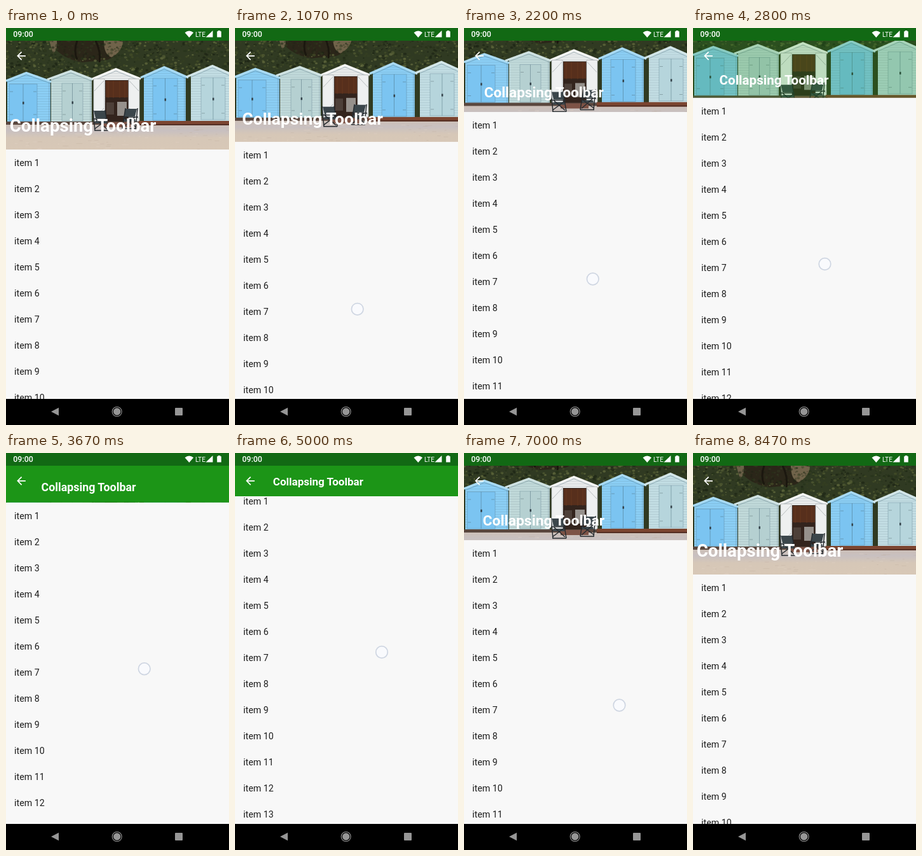
These frames come from a looping animation (351 by 624 pixels, 8590 ms). An HTML page:

```html
<!DOCTYPE html>
<html lang="en">
<head>
<meta charset="utf-8">
<title>Collapsing Toolbar</title>
<style>
  html, body { margin: 0; width: 100%; height: 100%; overflow: hidden; background: #f8f8f8; }
  svg { display: block; width: 100vw; height: 100vh; }
  text { font-family: Roboto, sans-serif; white-space: pre; }
</style>
</head>
<body>
<svg id="stage" viewBox="0 0 351 624">
  <defs>
    <clipPath id="listClip"><rect id="listBox" x="0" y="191" width="351" height="392"/></clipPath>
    <clipPath id="headClip"><rect id="headBox" x="0" y="0" width="351" height="191"/></clipPath>
    <linearGradient id="sand" x1="0" y1="0" x2="0" y2="1">
      <stop offset="0" stop-color="#cdbfb5"/>
      <stop offset=".25" stop-color="#c8c0c0"/>
      <stop offset=".5" stop-color="#d6c7b7"/>
      <stop offset="1" stop-color="#d8c8b7"/>
    </linearGradient>
    <pattern id="boards" width="8" height="4" patternUnits="userSpaceOnUse">
      <rect y="3" width="8" height=".8" fill="#345" opacity=".14"/>
    </pattern>
  </defs>

  <rect width="351" height="624" fill="#f8f8f8"/>
  <g clip-path="url(#listClip)"><g id="list" font-size="14.2" fill="#1c1c1c"></g></g>

  <g clip-path="url(#headClip)">
    <g id="photo"></g>
    <rect id="scrim" width="351" height="191" fill="#1c9517"/>
    <text id="title" font-weight="700" fill="#fff">Collapsing Toolbar</text>
  </g>
  <path transform="translate(13.75 33.6) scale(.854)" fill="#fff"
    d="M20 11H7.83l5.59-5.59L12 4l-8 8 8 8 1.41-1.41L7.83 13H20z"/>

  <g fill="#fff">
    <rect width="351" height="20" fill="#126914"/>
    <text x="11.3" y="14" font-size="12.4" font-weight="500">09:00</text>
    <path d="M281.5 7.2Q288.3 1.8 295.1 7.2L288.3 15Z"/>
    <text x="298" y="13.6" font-size="10.2">LTE</text>
    <path d="M325.5 4V14.5H314.5Z"/>
    <path d="M333.7 4H337.3V5.2H338.8V14.5H332.2V5.2H333.7Z"/>
  </g>

  <g fill="#969696">
    <rect y="583" width="351" height="41" fill="#000"/>
    <path d="M71 603L83 596.8V609.2Z"/>
    <circle cx="174.7" cy="603" r="5.7"/>
    <circle cx="174.7" cy="603" r="7.5" fill="none" stroke="#969696" stroke-width="1.1"/>
    <rect x="266" y="597" width="12" height="12" rx="1"/>
  </g>

  <circle id="touch" r="9.3" fill="#f9fafd" stroke="#cfd6e2" stroke-width="1.7"/>
</svg>

<script>
const $ = id => document.getElementById(id);
const LOOP = 8590, STEP = 200 / 3;
const OPEN = 191, CLOSED = 68, ROW = 41;

function add(parent, tag, attrs, text) {
  const el = document.createElementNS("http://www.w3.org/2000/svg", tag);
  for (const k in attrs) el.setAttribute(k, attrs[k]);
  if (text) el.textContent = text;
  parent.appendChild(el);
  return el;
}

let seed = 90731;
const rnd = () => (seed = seed * 16807 % 2147483647) / 2147483647;

const photo = $("photo");
const rect = (x, y, width, height, fill, more) =>
  add(photo, "rect", { x, y, width, height, fill, ...more });
const path = (d, fill, more) => add(photo, "path", { d, fill, ...more });

function drawBushes() {
  rect(0, 0, 351, 155, "#303a22");
  path("M68 0H182V22Q176 44 160 50L120 54Q84 48 68 20Z", "#2b2619");
  path("M154 20Q172 18 184 22Q182 38 166 46Q154 42 154 20Z", "#70634a");
  path("M68 20H80Q82 34 74 40Z", "#6b6048");
  const tones = ["#1c2414", "#27321a", "#353f22", "#465029", "#566035", "#6a7242"];
  for (let i = 0; i < 1300; i++) {
    const x = rnd() * 351, y = rnd() * 84, size = .6 + rnd() * 1.5;
    const shade = x > 72 && x < 182 && y < 48;
    add(photo, "ellipse", {
      cx: x.toFixed(1), cy: y.toFixed(1), rx: (size * 1.3).toFixed(1), ry: size.toFixed(1),
      fill: tones[Math.floor(rnd() * (shade ? 3 : 6))], opacity: shade ? .4 : .65
    });
  }
  path("M141 20Q150 38 147 54M112 20Q106 36 112 50", "none", { stroke: "#1b170f", "stroke-width": 3 });
}

// roof: left, apex x, right, apex y, eaves y; body: left, right, bottom
function drawHut([l, ax, r, ay, ey], [bl, br, bottom], wall, trim) {
  const d = `M${bl} ${bottom}V${ey - 1}L${ax} ${ay + 2}L${br} ${ey - 1}V${bottom}Z`;
  path(d, wall);
  path(d, "url(#boards)");
  rect(br - 3, ey, 3, bottom - ey, "#456", { opacity: .14 });
  path(`M${l} ${ey + 1}L${ax} ${ay + 1.5}L${r} ${ey + 1}`, "none", { stroke: trim, "stroke-width": 3.4 });
  path(`M${l + 3} ${ey + 3}L${ax} ${ay + 4.5}L${r - 3} ${ey + 3}`, "none",
    { stroke: "#3b5a68", "stroke-width": .8, opacity: .45 });
}

function drawDoor(x, y, w, h, fill) {
  rect(x, y, w, h, fill, { stroke: "#4a6c7c", "stroke-opacity": .45, "stroke-width": .7 });
  path(`M${x + w / 2} ${y}V${y + h}`, "none", { stroke: "#41606f", "stroke-width": .8, opacity: .55 });
  path(`M${x + 1} ${y + 12}h5M${x + w - 6} ${y + 12}h5M${x + 1} ${y + h - 10}h5M${x + w - 6} ${y + h - 10}h5`,
    "none", { stroke: "#4a5a60", "stroke-width": .8, opacity: .5 });
  rect(x + w / 2 - 1, y + h * .48, 2.5, 4, "#34424a");
}

function drawChair(x, y, dir) {
  const transform = `translate(${x} ${y}) scale(${dir} 1)`;
  path("M-11 2H7L9 14H-8ZM-8 18H9V22H-9Z", "#3b464b", { transform });
  path("M-12 1L-9 33M7 1L12 33M-8 15L10 31M10 16L-10 31M-13 15H11M-10 33H12", "none",
    { transform, stroke: "#262b2f", "stroke-width": 1.5 });
}

function drawPhoto() {
  drawBushes();
  rect(0, 150, 351, 100, "#d8c8b7");
  rect(0, 150, 351, 46, "url(#sand)");
  drawHut([-5, 32, 73, 69, 84], [2, 70, 148], "#8bcef4", "#a9daf3");
  drawDoor(5, 88, 44, 58, "#7bc4f1");
  drawHut([65, 102, 137, 66, 80], [71, 135, 148], "#c0d9d9", "#cfe2e2");
  drawDoor(88, 87, 33, 59, "#b5d0d1");
  drawHut([136, 173, 212, 63, 79], [139, 209, 148], "#e8ebeb", "#f5f6f5");
  rect(156, 82, 37, 66, "#33241d");
  rect(157, 83, 35, 26, "#572f1c");
  path("M161 83V110M169 83V110M179 83V110M187 83V110", "none", { stroke: "#6f3e22", opacity: .6 });
  rect(175, 116, 15, 22, "#96918c");
  rect(158, 117, 12, 19, "#4d4039");
  for (const x of [138, 193]) {
    rect(x, 80, 17, 66, "#eef0f0", { stroke: "#b0b5b6", "stroke-width": .8 });
    path(x < 150 ? "M139 99L154 83M139 143L154 126" : "M194 83L209 99M194 126L209 143", "none",
      { stroke: "#b8bdbe" });
  }
  drawHut([212, 249, 287, 60, 77], [217, 283, 147], "#8bcef4", "#a9daf3");
  drawDoor(231, 79, 39, 66, "#7bc4f1");
  drawHut([284, 325, 364, 58, 76], [291, 357, 147], "#c2dde3", "#d3e6e9");
  drawDoor(307, 78, 38, 66, "#b6d5dc");
  rect(0, 147, 212, 5, "#5a473e");
  rect(209, 146, 142, 7, "#7c4530");
  rect(209, 151, 142, 2, "#542f24");
  rect(152, 148, 44, 8, "#7d5346");
  drawChair(149, 128, 1);
  drawChair(195, 125, -1);
  for (let i = 0; i < 70; i++)
    rect((rnd() * 351).toFixed(1), (158 + rnd() * 33).toFixed(1), (2 + rnd() * 9).toFixed(1), .8,
      i % 2 ? "#bfae9e" : "#e4d6c7", { opacity: .45 });
}

function drawList() {
  for (let i = 0; i < 14; i++)
    add($("list"), "text", { x: 13.1, y: i * ROW + 5 }, "item " + (i + 1));
}

// time, touch x, touch y, centre of the first row
const keys = [
  [800, 190, 454, 212],
  [1600, 198, 418, 175.5],
  [2800, 207.5, 371, 130.5],
  [3950, 221, 329, 88.5],
  [4700, 231, 313, 76],
  [5130, 231, 313, 76],
  [6330, 240.5, 364.5, 126],
  [7000, 244.5, 396.5, 158],
  [7760, 254, 450, 212],
  [8330, 260, 541, 212]
];
const mix = (a, b, p) => a + (b - a) * p;
const clamp = v => Math.max(0, Math.min(1, v));

function poseAt(t) {
  let i = 0;
  while (i < keys.length - 2 && t > keys[i + 1][0]) i++;
  const a = keys[i], b = keys[i + 1], p = clamp((t - a[0]) / (b[0] - a[0]));
  return a.map((v, k) => mix(v, b[k], p));
}

// the screen refreshes 15 times a second, on 10 ms ticks
const startOf = n => Math.round(n * STEP / 10) * 10;
function snap(t) {
  let n = Math.floor((t + 5) / STEP);
  if (startOf(n) > t) n--;
  return startOf(n);
}

function set(id, attrs) {
  for (const k in attrs) $(id).setAttribute(k, attrs[k]);
}

function render(ms) {
  const t = snap(ms % LOOP);
  const [, x, y, row] = poseAt(t);
  const h = Math.max(CLOSED, row - 21);
  const p = (OPEN - h) / (OPEN - CLOSED);
  set("list", { transform: `translate(0 ${row})` });
  set("listBox", { y: h, height: 583 - h });
  set("headBox", { height: h });
  set("photo", { transform: `translate(0 ${(h - OPEN) / 2})` });
  set("scrim", { opacity: clamp((117 - h) / 33) });
  set("title", { x: mix(5.8, 59.8, p), y: mix(162.7, 51, p), "font-size": mix(27.6, 17, p) });
  set("touch", { cx: x, cy: y, visibility: t >= 730 && t < 8470 ? "visible" : "hidden" });
}

drawPhoto();
drawList();
const begin = performance.now();
function tick() {
  render(performance.now() - begin);
  requestAnimationFrame(tick);
}
render(0);
requestAnimationFrame(tick);
</script>
</body>
</html>
```
